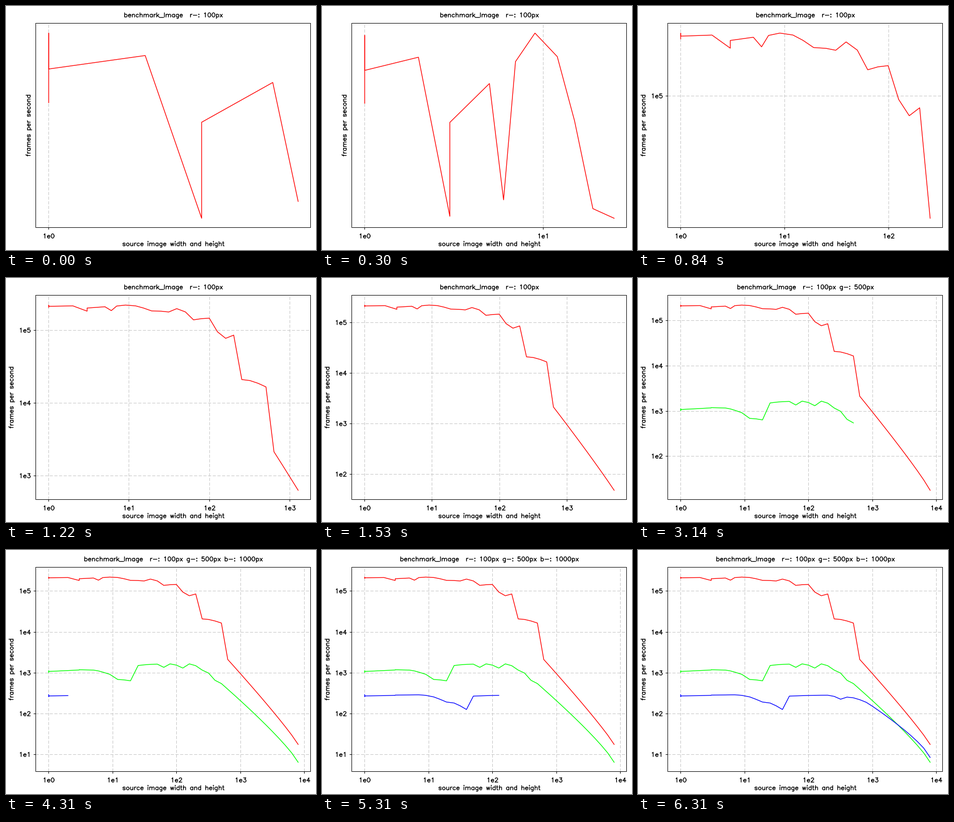
Recreate the animation shown at these times as a matplotlib script. Size 599 by 473 pixels, loop 6390 ms.

```python
import numpy as np
import matplotlib.pyplot as plt
from matplotlib.animation import FuncAnimation
from matplotlib.collections import LineCollection

plt.rcParams["path.snap"] = False

W, H, DPI = 599, 473, 100
LOOP, TICK, STEPS = 6390, 30, 83
PX = 72 / DPI
LEFT, TOP, RIGHT, BOTTOM = 57, 33, 588, 429    # plot frame
X0, X1, Y0, Y1 = 82, 564, 411, 52              # data extent in pixels
SCALE = 0.4                                    # stroke font units to pixels


# ---- stroke font, built from arcs and stems ----------------------------
def arc(cx, cy, rx, ry, a, b):
    t = np.radians(np.linspace(a, b, 16))
    return list(zip(cx + rx * np.cos(t), cy + ry * np.sin(t)))


def stem(x, top=14, low=0):
    return [(x, top), (x, low)]


def dot(x, y):
    return arc(x, y, 1, 1, 0, 360)


def shift(pts, dx):
    return [(x + dx, y) for x, y in pts]


BOWL_L = arc(9.5, 7, 6.5, 7, 35, 325)
BOWL_R = arc(9.5, 7, 6.5, 7, 145, -145)
ARCH = [(4, 10)] + arc(10.5, 10, 4.5, 4, 140, 0) + [(15, 0)]
CUP = [(19 - x, 14 - y) for x, y in ARCH]
BAR = [(2, 14), (9, 14)]

# character: (advance, strokes)
GLYPHS = {
    " ": (16, []),
    "_": (20, [[(0, -2), (20, -2)]]),
    "-": (26, [[(4, 9), (22, 9)]]),
    ":": (10, [dot(5, 13), dot(5, 1)]),
    "a": (19, [BOWL_L, stem(15)]),
    "b": (19, [BOWL_R, stem(4, 21)]),
    "c": (18, [BOWL_L]),
    "d": (19, [BOWL_L, stem(15, 21)]),
    "e": (18, [[(3, 8)] + arc(9.2, 7, 6.2, 7, 8, 325)]),
    "f": (12, [[(10, 21)] + arc(9, 17, 4, 4, 90, 180) + [(5, 0)], BAR]),
    "g": (19, [BOWL_L, [(15, 14)] + arc(10, -2, 5, 5, 0, -130)]),
    "h": (19, [stem(4, 21), ARCH]),
    "i": (8, [stem(4), dot(4, 21)]),
    "k": (17, [stem(4, 21), [(14, 14), (4, 4)], [(8, 8), (15, 0)]]),
    "m": (30, [stem(4), ARCH, shift(ARCH, 11)]),
    "n": (19, [stem(4), ARCH]),
    "o": (19, [arc(9.5, 7, 6.5, 7, 0, 360)]),
    "p": (19, [BOWL_R, stem(4, 14, -7)]),
    "r": (13, [stem(4), arc(11, 7, 7, 7, 170, 82)]),
    "s": (17, [arc(8.5, 10.5, 5.5, 3.5, 10, 250) + arc(8.5, 3.5, 5.5, 3.5, 75, -170)]),
    "t": (12, [[(5, 21)] + arc(9, 4, 4, 4, 180, 270) + [(10, 0)], BAR]),
    "u": (19, [CUP, stem(15)]),
    "w": (22, [[(3, 14), (7, 0), (11, 14), (15, 0), (19, 14)]]),
    "x": (17, [[(3, 14), (14, 0)], [(14, 14), (3, 0)]]),
    "I": (8, [stem(4, 21)]),
    "0": (20, [arc(10, 10.5, 7, 10.5, 0, 360)]),
    "1": (20, [[(6, 17), (8, 18), (11, 21), (11, 0)]]),
    "2": (20, [arc(10, 15.5, 6, 5.5, 175, -30) + [(3, 0), (17, 0)]]),
    "3": (20, [[(5, 21), (16, 21), (10, 13)] + arc(10, 6.5, 7, 6.5, 90, -160)]),
    "4": (20, [[(13, 0), (13, 21), (3, 7), (18, 7)]]),
    "5": (20, [[(15, 21), (5, 21), (4, 12)] + arc(10, 7, 7, 7, 130, -155)]),
}


def write(text, x, y, upright=True):
    """Strokes of a text centred on its baseline point (x, y)."""
    pen = -sum(GLYPHS[c][0] for c in text) / 2
    out = []
    for c in text:
        advance, strokes = GLYPHS[c]
        for s in strokes:
            p = (np.array(s, float) + (pen, 0)) * SCALE
            if upright:
                out.append(np.column_stack((x + p[:, 0], y - p[:, 1])))
            else:
                out.append(np.column_stack((x - p[:, 1], y - p[:, 0])))
        pen += advance
    return out


# ---- benchmark model: log10 of size and of frames per second -----------
N = 40
LOG_X = np.log10(np.floor(10 ** (np.arange(N) / 10) - 1e-9).clip(1))


def curve(keys, end, power):
    """Round-topped arcs through the key points, then a power-law tail."""
    out = []
    for (k0, a), (k1, b) in zip(keys, keys[1:]):
        u = np.arange(k1 - k0) / (k1 - k0) * np.pi / 2
        out.extend(a + (b - a) * (np.sin(u) if b > a else 1 - np.cos(u)))
    last, value = keys[-1]
    left = np.arange(N - 2 - last, -1, -1)
    return np.array(out + [value, *(end + 0.228 * left ** power)])


RED = curve([(0, 5.315), (2, 5.346), (3, 5.330), (4, 5.336), (5, 5.2635), (7, 5.324),
             (8, 5.271), (9, 5.334), (10, 5.347), (13, 5.267), (15, 5.252), (16, 5.298),
             (18, 5.144), (20, 5.167), (21, 4.98), (22, 4.89), (23, 4.934), (24, 4.323),
             (27, 4.222)], 1.25, 0.922)
GREEN = curve([(0, 3.055), (2, 3.011), (6, 3.078), (9, 3.02), (11, 2.84), (13, 2.807),
               (14, 3.182), (17, 3.215), (18, 3.137), (19, 3.222), (21, 3.12),
               (22, 3.222), (24, 3.07), (26, 2.82)], 0.813, 0.859)
BLUE = curve([(0, 2.47), (1, 2.42), (9, 2.465), (13, 2.288), (16, 2.105), (17, 2.433),
              (23, 2.455), (25, 2.357), (26, 2.408), (29, 2.282)], 0.931, 0.775)
SERIES = [(RED, "#ff0000", "r-: 100px"), (GREEN, "#00ff00", "g-: 500px"),
          (BLUE, "#0000ff", "b-: 1000px")]


def points_at(ms):
    """Steady measuring, a short hold, then a slower last run."""
    step = int((ms + 38) * STEPS / LOOP)
    return int(min(9.3 + 1.45 * step, 79) + 1.33 * max(step - 51, 0))


# ---- figure ------------------------------------------------------------
fig = plt.figure(figsize=(W / DPI, H / DPI), dpi=DPI, facecolor="white")
ax = fig.add_axes([0, 0, 1, 1])
ax.set(xlim=(-0.5, W - 0.5), ylim=(H - 0.5, -0.5))
ax.axis("off")


def strokes(width, color, z, **kw):
    lc = LineCollection([], linewidths=width * PX, colors=color, zorder=z, **kw)
    return ax.add_collection(lc, autolim=False)


grid = strokes(1, "#c4c4c4", 1, linestyles=[(0, (6, 3))])
ticks = strokes(1, "black", 2)
words = strokes(1.4, "black", 4, capstyle="round")
curves = [ax.plot([], [], color=c, lw=1.4 * PX, zorder=3, solid_joinstyle="round")[0]
          for _, c, _ in SERIES]
ax.plot([LEFT, RIGHT, RIGHT, LEFT, LEFT], [TOP, TOP, BOTTOM, BOTTOM, TOP],
        color="black", lw=PX, zorder=2, solid_joinstyle="miter")


def update(i):
    total = points_at(i * TICK)
    counts = [min(max(total - N * k, 0), N) for k in range(len(SERIES))]
    seen = np.concatenate([s[0][:n] for s, n in zip(SERIES, counts)])
    low, high = seen.min(), seen.max()
    x_max = LOG_X[counts[0] - 1]

    def to_x(v):
        return X0 + (X1 - X0) * v / x_max

    def to_y(v):
        return Y0 + (Y1 - Y0) * (v - low) / (high - low)

    for line, (vals, _, _), n in zip(curves, SERIES, counts):
        line.set_data(to_x(LOG_X[:n]), to_y(vals[:n]))

    dashes, marks, text = [], [], []
    for e in range(5):
        x = round(to_x(e))
        if x < RIGHT:
            dashes.append([(x, BOTTOM), (x, TOP)])
            marks.append([(x, BOTTOM), (x, BOTTOM + 4)])
            text += write(f"1e{e}", x, 449.5)
    y_labels = False
    for e in range(1, 6):
        y = round(to_y(e))
        if TOP < y < BOTTOM:
            y_labels = True
            dashes.append([(LEFT, y), (RIGHT, y)])
            marks.append([(LEFT - 4, y), (LEFT, y)])
            text += write(f"1e{e}", 36, y + 4)

    legend = " ".join(s[2] for s, n in zip(SERIES, counts) if n)
    text += write("benchmark_Image  " + legend, 323, 21)
    text += write("source image width and height", 323, 464.5)
    text += write("frames per second", 13.5 if y_labels else 46.5, 231, upright=False)

    grid.set_segments(dashes)
    ticks.set_segments(marks)
    words.set_segments(text)
    return [grid, ticks, words, *curves]


anim = FuncAnimation(fig, update, frames=LOOP // TICK, interval=TICK,
                     repeat=True, repeat_delay=0, blit=False)
plt.show()
```
